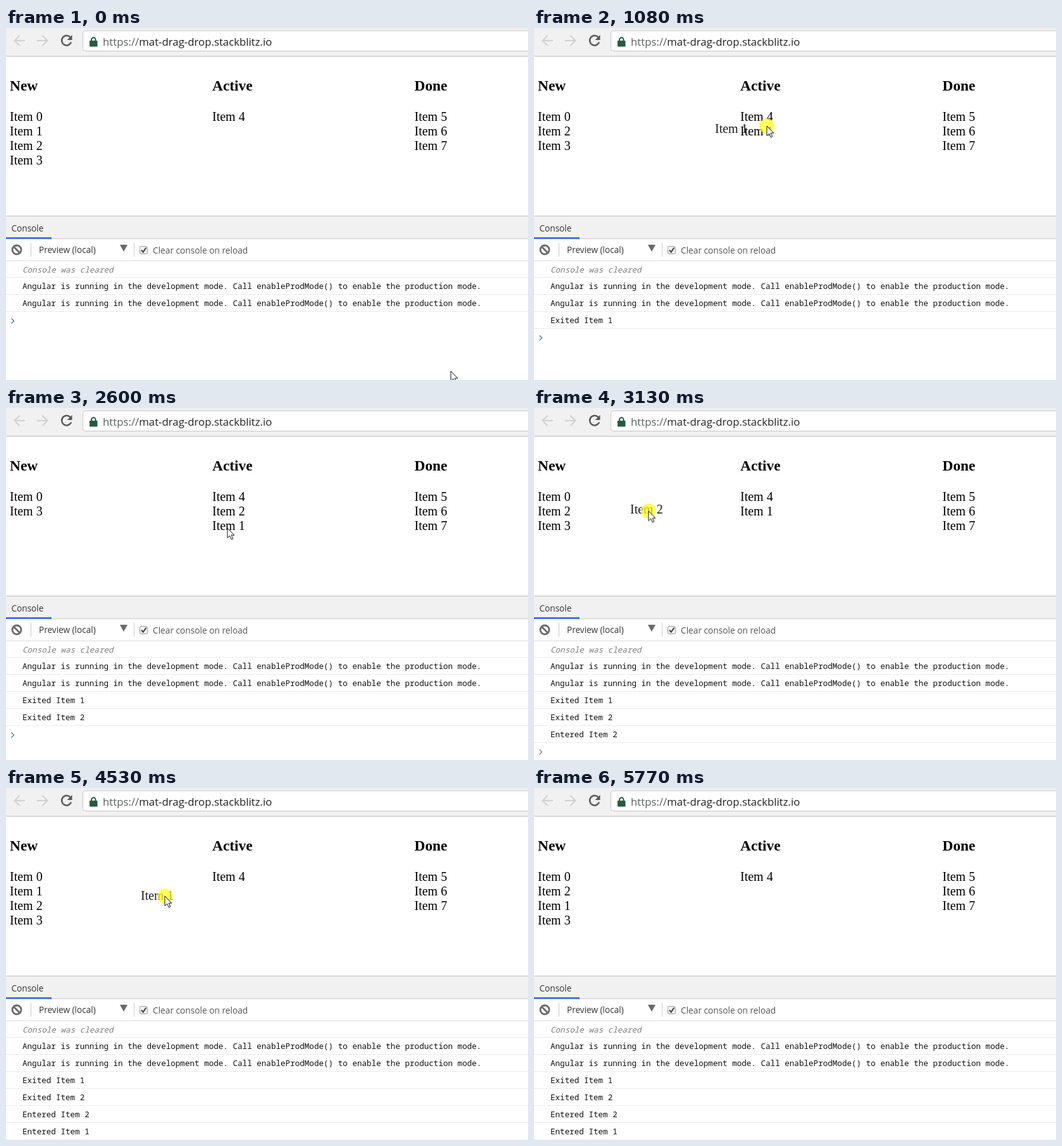
Animation of 825x557 px, one loop 6160 ms. Source, as an HTML page:

```html
<!DOCTYPE html>
<html lang="en">
<head>
<meta charset="utf-8">
<title>Drag and drop lists</title>
<style>
  html, body { margin: 0; width: 100%; height: 100%; overflow: hidden; background: #fff; }
  svg { display: block; }
  text { white-space: pre; }
  .page { font: 20px "Liberation Serif", "Times New Roman", serif; fill: #000; }
  .head { font-size: 23.4px; font-weight: bold; }
  .ui { font: 13.6px "Open Sans", sans-serif; fill: #333; }
  .url { font-size: 16.8px; fill: #222; }
  .log { font: 12.6px "Noto Sans Mono", monospace; fill: #111; }
  .cleared { font-style: italic; fill: #808080; }
</style>
</head>
<body>
<svg width="825" height="557" viewBox="0 0 825 557">
  <!-- browser bar -->
  <path fill="#f1f1f1" d="M0 0H825V44H0z"/>
  <path fill="#c8c8c8" d="M0 44H825V45H0z"/>
  <path fill="#ececec" d="M0 45H825V46H0z"/>
  <rect x="121.5" y="4.5" width="720" height="32" rx="4" fill="#fff" stroke="#c6c6c6"/>
  <g fill="none" stroke="#d2d2d2" stroke-width="2.2">
    <path d="M30 20H14M21.5 12L13.5 20L21.5 28"/>
    <path d="M49 20H65M57.5 12L65.5 20L57.5 28"/>
    <path stroke="#5a5a5a" stroke-width="2.5" d="M101.5 14.5A7.7 7.7 0 1 0 103 22.5"/>
  </g>
  <path fill="#5a5a5a" d="M104.5 11V19H96.5z"/>
  <rect x="132" y="20" width="12.5" height="9.5" rx="1" fill="#245c40"/>
  <path fill="none" stroke="#245c40" stroke-width="2" d="M135 21V18.5A3.2 3.2 0 0 1 141.5 18.5V21"/>
  <text class="ui url" x="153" y="28"><tspan fill="#59615c">https://</tspan>mat-drag-drop.stackblitz.io</text>

  <g class="page head">
    <text x="6" y="99">New</text>
    <text x="326" y="99">Active</text>
    <text x="645.5" y="99">Done</text>
  </g>

  <!-- console panel -->
  <path fill="#f1f1f1" d="M0 298H825V333H0z"/>
  <path fill="#bcbcbc" d="M0 297H825V298H0z"/>
  <path fill="#cacaca" d="M0 333H825V334H0zM39 340H40V362H39zM202 340H203V362H202z"/>
  <path fill="#3b78e7" d="M0 331H72V334H0z"/>
  <path fill="#dcdcdc" d="M0 368H825V369H0z"/>
  <g fill="none" stroke="#6a6a6a" stroke-width="2.8">
    <circle cx="17" cy="351" r="7"/>
    <path d="M12 346L22 356"/>
  </g>
  <path fill="#6a6a6a" d="M180 343H192L186 354z"/>
  <rect x="211.5" y="345.5" width="12" height="12" rx="2" fill="#f2f2f2" stroke="#9a9a9a"/>
  <path fill="none" stroke="#444" stroke-width="2.2" d="M214 351.5L216.8 354.5L221.5 347.5"/>
  <g class="ui">
    <text x="8.5" y="322">Console</text>
    <text x="52" y="356">Preview (local)</text>
    <text x="232" y="357" font-size="13.7" fill="#555">Clear console on reload</text>
  </g>

  <g id="lists" class="page"></g>
  <g id="logs" class="log"></g>
  <path id="prompt" fill="none" stroke-width="1.4" d="M8.5 459.5L12.5 463.5L8.5 467.5"/>
  <text id="preview" class="page" opacity=".88"></text>
  <g id="mouse">
    <circle id="press" r="12" fill="#ffff20" opacity=".72"/>
    <path fill="#fff" stroke="#111" d="M0 0V15.5L3.7 12.1L6.3 18L8.8 16.9L6.2 11.2H10.8z"/>
  </g>
</svg>
<script>
const LOOP = 6160, TICK = 76.6, EXIT = 75;

// Pointer stops: tick, x, y
const stops = [
  [0, 703, 543], [7, 49, 155], [9, 88, 159], [12, 100, 159], [14, 368, 155], [16, 325, 160],
  [21, 34, 166], [22.85, 34, 166], [26, 383, 164], [28, 383, 164], [32, 365, 216],
  [34, 350, 190], [37, 355, 166], [44, 68, 161], [46, 68, 161], [49, 75, 174], [51, 75, 174],
  [56, 364, 164], [56.75, 364, 164], [62, 77, 181], [65, 77, 181], [68, 104, 48],
  [71, 104, 36], [EXIT, 640, 536]
];

const drags = [
  { press: 9, drop: 15, item: 1 },
  { press: 22, drop: 29, item: 2 },
  { press: 37, drop: 43, item: 2 },
  { press: 56, drop: 65, item: 1 }
];

// Where an item lands while it is dragged
const moves = [
  { tick: 14, item: 1, to: "active", index: 1 },
  { tick: 26, item: 2, to: "active", index: 1 },
  { tick: 40, item: 2, to: "fresh", index: 1 },
  { tick: 59, item: 1, to: "fresh", index: 1 },
  { tick: 61, item: 1, to: "fresh", index: 2 }
];

const left = { fresh: 6, active: 326, done: 645.5 };
const notice = "Angular is running in the development mode. Call enableProdMode() to enable the production mode.";

const $ = id => document.getElementById(id);
const label = (x, y, text, cls = "") => `<text x="${x}" y="${y}" class="${cls}">${text}</text>`;
const rowY = i => 147 + 23 * i;

function pointer(k) {
  const i = stops.findIndex(s => s[0] > k);
  if (i < 0) return stops.at(-1).slice(1);
  const [a, b] = [stops[i - 1], stops[i]];
  const u = (k - a[0]) / (b[0] - a[0]), e = u * u * (3 - 2 * u);
  return [1, 2].map(n => a[n] + (b[n] - a[n]) * e);
}

function board(k) {
  const lists = { fresh: [0, 1, 2, 3], active: [4], done: [5, 6, 7] };
  const log = ["Console was cleared", notice, notice];
  for (const { tick, item, to, index } of moves) {
    if (tick > k) break;
    const from = Object.keys(lists).find(name => lists[name].includes(item));
    lists[from].splice(lists[from].indexOf(item), 1);
    lists[to].splice(index, 0, item);
    if (from !== to) log.push((to === "fresh" ? "Entered Item " : "Exited Item ") + item);
  }
  return { lists, log };
}

function place(lists, item) {
  const name = Object.keys(lists).find(key => lists[key].includes(item));
  return [left[name], rowY(lists[name].indexOf(item))];
}

function render(k) {
  const { lists, log } = board(k);
  $("lists").innerHTML = Object.values(lists).flat()
    .map(item => label(...place(lists, item), "Item " + item)).join("");

  $("logs").innerHTML = log.map((text, i) => {
    const y = 394 + 27 * i;
    return label(26, y - (i ? 8 : 7), text, i ? "" : "cleared") +
      `<path fill="#ececec" d="M0 ${y}H825V${y + 1}H0z"/>`;
  }).join("");
  const extra = log.length - 3;
  $("prompt").setAttribute("transform", `translate(0 ${27 * extra})`);
  $("prompt").setAttribute("stroke", extra < 3 ? "#4a74dc" : "#888");

  const [x, y] = pointer(k).map(Math.round);
  $("mouse").setAttribute("transform", `translate(${x} ${y})`);
  $("mouse").style.display = k < EXIT ? "" : "none";

  const drag = drags.find(d => k > d.press && k < d.drop);
  $("press").style.display = drag ? "" : "none";
  const preview = $("preview");
  preview.textContent = drag ? "Item " + drag.item : "";
  if (drag) {
    const [gx, gy] = pointer(drag.press);
    const [ix, iy] = place(board(drag.press).lists, drag.item);
    preview.setAttribute("x", ix + x - gx);
    preview.setAttribute("y", iy + y - gy);
  }
}

let last = -1;
function frame(now) {
  const k = Math.floor((now % LOOP + 10) / TICK);
  if (k !== last) render(last = k);
  requestAnimationFrame(frame);
}
render(0);
requestAnimationFrame(frame);
</script>
</body>
</html>
```
